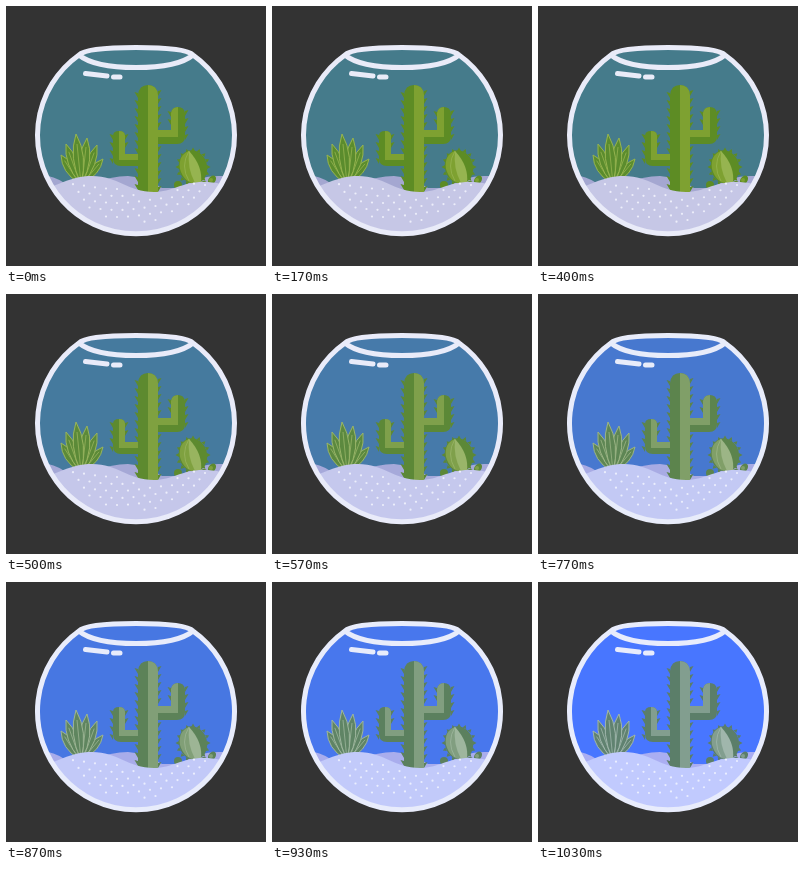
An HTML page for the animation above (4.01 s loop, 260 by 260 pixels).

```html
<!DOCTYPE html>
<html lang="en">
<head>
<meta charset="utf-8">
<title>Cactus bowl</title>
<style>
html, body { margin: 0; width: 100%; height: 100%; overflow: hidden; background: #333; }
svg { display: block; width: 100vw; height: 100vh; }
.water { fill: var(--water); }
.back { fill: var(--back); }
.sand { fill: var(--sand); }
.dark { fill: var(--dark); }
.light { fill: var(--light); }
.pale { fill: var(--edge); }
.leaf { fill: var(--leaf); stroke: var(--edge); stroke-width: 1; stroke-linejoin: round; }
.vein { fill: none; stroke: var(--edge); stroke-width: .8; }
.dots { fill: var(--dot); }
.glass { fill: none; stroke: var(--glass); stroke-width: 5; stroke-linecap: round; stroke-linejoin: round; }
</style>
</head>
<body>
<svg id="scene" viewBox="0 0 260 260" xmlns="http://www.w3.org/2000/svg">
  <defs>
    <clipPath id="inside"><path d="M73 49A98.500 98.500 0 1 0 187 49Q180 41.500 130 41.500Q80 41.500 73 49Z"/></clipPath>
  </defs>
  <rect width="260" height="260" fill="#333"/>
  <g clip-path="url(#inside)">
    <rect class="water" x="28" y="36" width="206" height="198"/>
    <path class="back" d="M28 170Q44 167 60 178H84Q106 170 122 170Q140 171 156 182H174Q192 170 212 170H232V232H28Z"/>
    <g id="aloe"></g>
    <g id="cactus">
      <path id="spines" class="dark"/>
      <path class="dark" d="M132 190V160H115Q107 160 107 152V130Q107 125 113 125Q119 125 119 130V148H132V89Q133 79 142 79Q151 79 152 89V124H165V107Q166 101 172 101Q178 101 179 107V130Q179 138 171 138H152V190Z"/>
      <path class="light" d="M142 79Q151 79 152 89V124H165V107Q166 101 172 101V131H152V190H142ZM113 125Q119 125 119 130V148H132V154H113Z"/>
    </g>
    <g id="barrel">
      <path id="prickles" class="dark"/>
      <ellipse class="dark" cx="187" cy="161" rx="14" ry="17" transform="rotate(-14 187 161)"/>
      <path class="light" d="M183 145Q172 149 174 163Q178 177 191 178Q194 160 183 145Z"/>
      <path class="pale" d="M183 145Q181 162 189 177H195Q197 160 183 145Z"/>
      <path class="vein" d="M183 145Q174 160 183 175"/>
      <circle class="dark" cx="172" cy="179" r="4"/>
      <ellipse class="dark" cx="206" cy="174" rx="3.500" ry="5" transform="rotate(35 206 174)"/>
      <circle class="light" cx="205" cy="174" r="2"/>
      <circle class="dark" cx="198" cy="178" r="3"/>
    </g>
    <path class="sand" d="M28 186C50 182 62 170 86 170C112 170 122 186 148 186C166 186 176 176 197 176C212 176 222 179 232 183V234H28Z"/>
    <g id="dots" class="dots"></g>
  </g>
  <path class="glass" d="M73 49A98.500 98.500 0 1 0 187 49Q180 41.500 130 41.500Q80 41.500 73 49Q88 61.500 130 61.500Q172 61.500 187 49"/>
  <path class="glass" d="M79.500 67.500L101 70M107.500 71H114"/>
</svg>
<script>
const LOOP = 4010;
const FADE_START = 400, FADE_TIME = 630;
const scene = document.getElementById("scene");
const byId = id => document.getElementById(id);

// Start and end colour of every part
const palette = {
  water: [[69, 123, 139], [72, 118, 255]],
  back:  [[164, 167, 209], [170, 174, 242]],
  sand:  [[198, 199, 230], [193, 202, 254]],
  dark:  [[93, 140, 36], [91, 126, 105]],
  light: [[126, 161, 49], [130, 158, 143]],
  leaf:  [[91, 140, 45], [96, 130, 112]],
  edge:  [[150, 180, 80], [160, 182, 172]],
  dot:   [[237, 238, 250], [234, 238, 255]],
  glass: [[233, 235, 248], [232, 236, 252]]
};

function leaf(x, y, tipX, tipY, w) {
  const dx = tipX - x, dy = tipY - y, len = Math.hypot(dx, dy);
  const mx = x + dx * .55, my = y + dy * .55;
  const nx = -dy / len * w, ny = dx / len * w;
  return `<path class="leaf" d="M${x} ${y}Q${mx + nx} ${my + ny} ${tipX} ${tipY}Q${mx - nx} ${my - ny} ${x} ${y}Z"/>` +
    `<path class="vein" d="M${x} ${y}L${x + dx * .8} ${y + dy * .8}"/>`;
}

function spikes(x, from, to, side) {
  let d = "";
  for (let y = from; y <= to; y += 8) d += `M${x} ${y - 1}l${side * 3.5} -1l${-side * 3.5} 6z`;
  return d;
}

function build() {
  byId("aloe").innerHTML = [
    [73, 177, 55, 149, 9], [77, 177, 97, 153, 8], [74, 177, 60, 138, 9],
    [77, 177, 91, 139, 9], [76, 177, 81, 132, 10], [75, 178, 70, 128, 10]
  ].map(a => leaf(...a)).join("");

  byId("spines").setAttribute("d",
    spikes(132, 88, 144, -1) + spikes(132, 164, 180, -1) +
    spikes(152, 86, 118, 1) + spikes(152, 142, 182, 1) +
    spikes(107, 130, 154, -1) + spikes(119, 130, 142, 1) +
    spikes(165, 107, 119, -1) + spikes(179, 106, 132, 1));

  let prickles = "";
  for (let i = 0; i < 16; i++) {
    const a = i * Math.PI / 8, c = Math.cos(a), s = Math.sin(a);
    const x = 187 + 14 * c, y = 161 + 16 * s;
    prickles += `M${x - 2 * s} ${y + 2 * c}L${x + 3.5 * c} ${y + 3.5 * s}L${x + 2 * s} ${y - 2 * c}Z`;
  }
  byId("prickles").setAttribute("d", prickles);

  let dots = "";
  for (let row = 0; row < 6; row++) {
    for (let col = 0; col < 14; col++) {
      const x = 56 + col * 11 + row % 2 * 5.5;
      const y = 180 + row * 7 + 3 * Math.sin((x - 80) / 20);
      const surface = 178 - 8 * Math.cos((x - 86) / 19);
      const inBowl = Math.hypot(x - 130, y - 129) < 88;
      if (y > surface + 4 && inBowl) dots += `<circle cx="${x}" cy="${y}" r="1.1"/>`;
    }
  }
  byId("dots").innerHTML = dots;
}

function render(t) {
  const p = Math.min(1, Math.max(0, (t - FADE_START) / FADE_TIME));
  for (const [name, [a, b]] of Object.entries(palette)) {
    const rgb = a.map((v, i) => Math.round(v + (b[i] - v) * p));
    scene.style.setProperty("--" + name, `rgb(${rgb})`);
  }
}

build();
render(0);
const start = performance.now();
function tick() {
  render((performance.now() - start) % LOOP);
  requestAnimationFrame(tick);
}
requestAnimationFrame(tick);
</script>
</body>
</html>
```
